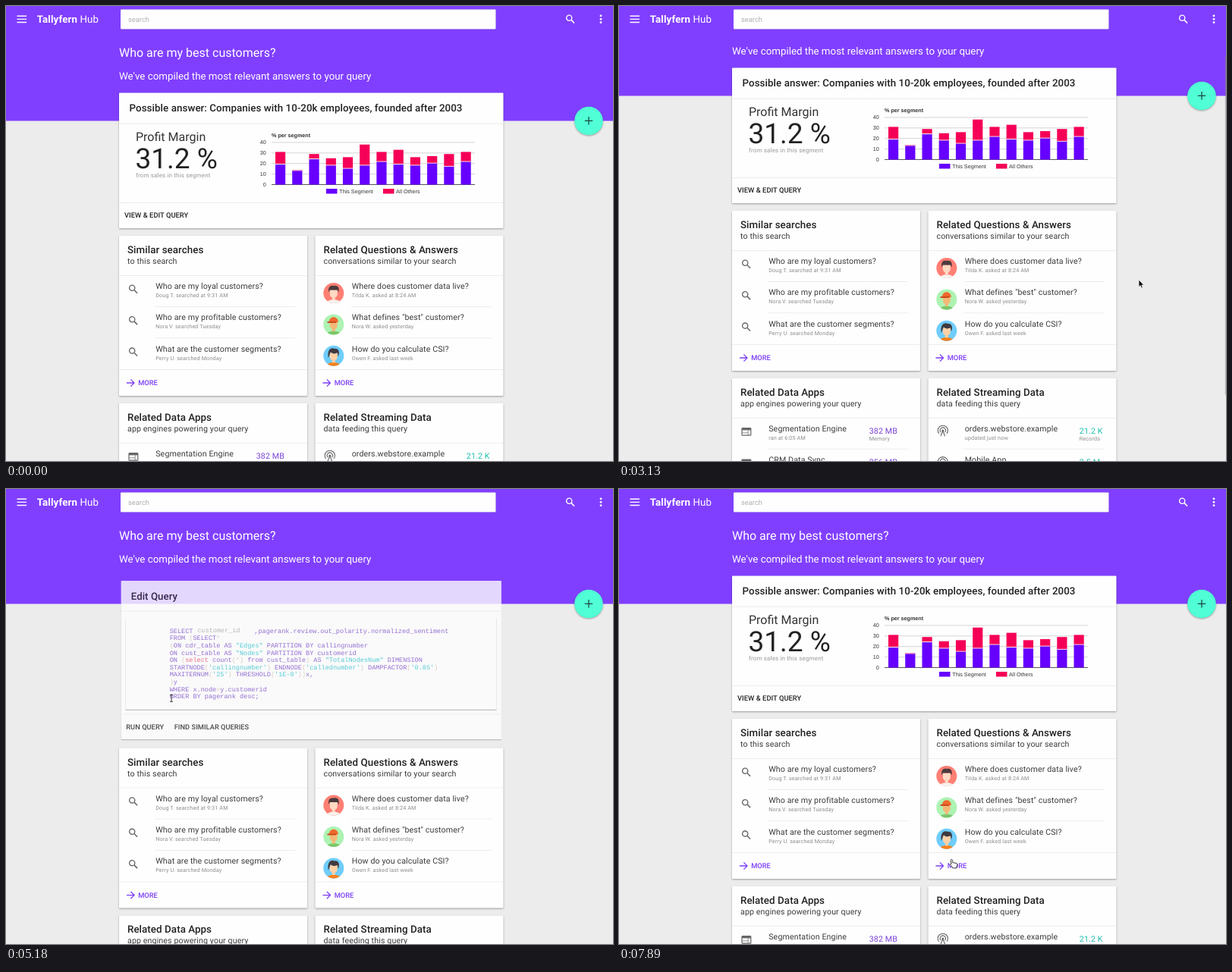
An HTML page for the animation above (8 s loop, 800 px wide and 600 px high).

```html
<!DOCTYPE html>
<html lang="en">
<head>
<meta charset="utf-8">
<title>Dashboard walkthrough</title>
<style>
html, body { margin: 0; width: 100%; height: 100%; overflow: hidden; background: #ececec; }
svg { display: block; width: 800px; height: 600px; }
text { font-family: Roboto, sans-serif; fill: #3c3c3c; white-space: pre; text-rendering: geometricPrecision; }
.hero { font-size: 16px; fill: #fff; }
.lead { font-size: 13.33px; fill: #fff; }
.title { font-size: 13.33px; font-weight: 500; letter-spacing: .005em; fill: #222; }
.body { font-size: 10.67px; letter-spacing: .01em; }
.small { font-size: 7.2px; letter-spacing: .02em; fill: #8c8c8c; }
.note { font-size: 8px; letter-spacing: .02em; fill: #999; }
.button { font-size: 9.33px; font-weight: 500; letter-spacing: .005em; fill: #222; }
.more { font-size: 9.33px; font-weight: 500; fill: #7c3ff5; }
.big { font-size: 37px; fill: #222; }
.axis { font: 7.2px "Liberation Sans", Arial, sans-serif; fill: #333; }
.axis.end { text-anchor: end; }
.axis.bold { font-weight: 700; }
.code { font: 8.65px "Liberation Mono", "Courier New", monospace; fill: #7d50cc; }
.card { fill: #fefefe; filter: drop-shadow(0 1px .8px rgba(0,0,0,.35)); }
</style>
</head>
<body>
<svg id="stage" viewBox="0 0 800 600"></svg>
<script>
const PURPLE = '#803fff', LOOP = 8000;

// ---- drawing helpers ----
const text = (x, y, cls, str, extra = '') => `<text x="${x}" y="${y}" class="${cls}" ${extra}>${str}</text>`;
const rect = (x, y, w, h, fill, extra = '') => `<rect x="${x}" y="${y}" width="${w}" height="${h}" fill="${fill}" ${extra}/>`;
const circle = (x, y, r, fill, extra = '') => `<circle cx="${x}" cy="${y}" r="${r}" fill="${fill}" ${extra}/>`;
const path = (d, fill, extra = '') => `<path d="${d}" fill="${fill}" ${extra}/>`;
const stroke = (d, color, w) => path(d, 'none', `stroke="${color}" stroke-width="${w}"`);
const group = (body, extra = '') => `<g ${extra}>${body}</g>`;
const at = (x, y, body) => group(body, `transform="translate(${x} ${y})"`);
const card = (x, y, w, h) => rect(x, y, w, h, '#fefefe', 'class="card" rx="1"');
const rule = (x, y, w) => rect(x, y, w, .8, '#ebe8e6');

// ---- icons, centred on 0,0 ----
const lens = color => circle(-1.5, -1.5, 3.6, 'none', `stroke="${color}" stroke-width="1.35"`) + stroke('M1.2 1.2L5.4 5.4', color, 1.5);
const appWindow = rect(-5.7, -4.6, 11.8, 9.6, 'none', 'stroke="#666" stroke-width="1.2" rx=".8"') +
  rect(-5.7, -4.6, 11.8, 2.8, '#666') + stroke('M-5.7 1.6H2.5M2.5 -2V5', '#777', .8);
const antenna = stroke('M-5.2 3.6A6.6 6.6 0 1 1 5.2 3.6M-2.6 1.8A3.6 3.6 0 1 1 2.6 1.8M0 0L-2.8 7M0 0L2.8 7', '#666', 1.1) + circle(0, -.4, 1.5, '#666');

const SKIN = '#ffd0a6';
const face = skin => rect(-2, 3, 4, 6, skin) + path('M-5 -4H5V1C5 8 -5 8 -5 1Z', skin);
const avatars = [
  ['#ff7f74', path('M-10 14C-9 7 9 7 10 14Z', '#f6f2ee') + face('#ffd9c2') +
    path('M-6.5 -1C-8 -10 -2 -10 0 -9.5C6 -11 8 -6 6.5 -1L5 -4H-5Z', '#4b3a3d')],
  ['#adf3b3', path('M-10 14C-9 7 9 7 10 14Z', '#7cc76a') + face('#f5b877') +
    path('M-6 -3C-6 -12 6 -12 6 -3Z', '#f0682c') + rect(-8.5, -4, 12, 2, '#c94c1d', 'rx="1"')],
  ['#6fcdfb', path('M-10 14C-9 7 9 7 10 14Z', '#f58220') + face(SKIN) +
    path('M-7 3C-9 -10 -2 -11 1 -9.5C8 -10 8 -3 6 1L5 -4C1 -2 -2 -3 -4 -5Z', '#403a40')]
].map(([back, figure]) => circle(0, 0, 13.5, back) + group(figure, 'clip-path="url(#disc)"'));

// ---- cards ----
function listCard(x, y, title, sub, rows, o) {
  let out = card(x, y, 248, 211) + text(x + 11, y + 23, 'title', title) + text(x + 11, y + 37, 'body', sub) +
    rule(x, y + 52, 248) + rule(x, y + 176, 248);
  rows.forEach(([name, info, value, unit], i) => {
    const ry = y + i * 41.4;
    out += at(x + o.iconX, ry + o.iconY, o.icons[i % o.icons.length]) +
      text(x + 48.2, ry + 70, 'body', name) + text(x + 48.2, ry + 81, 'small', info);
    if (value) out += text(x + o.valueX, ry + 73, 'body', value, `style="fill:${o.color}"`) + text(x + o.valueX, ry + 82, 'small', unit);
    if (i < 2) out += rule(x + 47, ry + 93, 185);
  });
  return out + stroke(`M${x + 10} ${y + 194}h10m-4.6 -4.6l4.6 4.6l-4.6 4.6`, '#7c3ff5', 1.3) + text(x + 25.2, y + 197.3, 'more', 'MORE');
}

const lists =
  listCard(149, 303, 'Similar searches', 'to this search', [
    ['Who are my loyal customers?', 'Doug T. searched at 9:31 AM'],
    ['Who are my profitable customers?', 'Nora V. searched Tuesday'],
    ['What are the customer segments?', 'Perry U. searched Monday']
  ], { icons: [lens('#666')], iconX: 18.7, iconY: 70.3 }) +
  listCard(407.5, 303, 'Related Questions &amp; Answers', 'conversations similar to your search', [
    ['Where does customer data live?', 'Tilda K. asked at 8:24 AM'],
    ['What defines "best" customer?', 'Nora W. asked yesterday'],
    ['How do you calculate CSI?', 'Owen F. asked last week']
  ], { icons: avatars, iconX: 24.3, iconY: 75.5 }) +
  listCard(149, 523.8, 'Related Data Apps', 'app engines powering your query', [
    ['Segmentation Engine', 'ran at 6:05 AM', '382 MB', 'Memory'],
    ['CRM Data Sync', 'ran at 4:35 AM', '256 MB', 'Memory'],
    ['Daily Financials', 'ran at 5:45 AM', '1256 MB', 'Memory']
  ], { icons: [appWindow], iconX: 18.7, iconY: 70.4, valueX: 180.7, color: '#7a42d8' }) +
  listCard(407.5, 523.8, 'Related Streaming Data', 'data feeding this query', [
    ['orders.webstore.example', 'updated just now', '21.2 K', 'Records'],
    ['Mobile App', 'updated at 8:15 AM', '2.5 M', 'Records'],
    ['Tablet App', 'updated at 8:05 AM', '0.9 K', 'Records']
  ], { icons: [antenna], iconX: 19.3, iconY: 69.5, valueX: 199.3, color: '#1fbfae' });

function chart() {
  const base = 235.5, unit = 1.39, inner = [19, 13, 24, 18, 15, 18, 21.5, 19, 18, 20, 17, 21.5],
    total = [31, 14, 29, 25, 26, 38, 31, 33, 26, 27, 29, 31];
  let out = text(350, 173, 'axis bold', '% per segment');
  for (let v = 0; v <= 40; v += 10) {
    const y = base - v * unit;
    out += rect(350, y - .4, 268, .9, v ? '#cfcfcf' : '#444') + text(342.7, y + 2.5, 'axis end', v);
  }
  inner.forEach((v, i) => {
    const x = 355 + i * 22.23, mid = base - v * unit, top = base - total[i] * unit;
    out += rect(x, top, 13.2, mid - top, '#f50057') + rect(x, mid - 1, 13.2, 1, '#fff') + rect(x, mid, 13.2, base - mid, '#6600ff');
  });
  return out + rect(422, 241, 14.5, 6.5, '#6600ff') + text(439.3, 246.8, 'axis', 'This Segment') +
    rect(497, 241, 14.5, 6.5, '#f50057') + text(514, 246.8, 'axis', 'All Others');
}

const answer = card(149, 114.5, 506.5, 178.5) + text(162.5, 139.3, 'title', 'Possible answer: Companies with 10-20k employees, founded after 2003') +
  rule(149, 154.8, 506.5) + rule(149, 259, 506.5) +
  text(171, 178, 'hero', 'Profit Margin', 'style="fill:#333"') + text(170.5, 213.5, 'big', '31.2 %') +
  text(171, 226, 'note', 'from sales in this segment') + chart() +
  rect(152, 264.5, 93, 23.5, '#e8e8e8', 'id="hover" rx="1.5"') + circle(218, 276, 8.5, '#c4c4c4', 'id="ripple"') +
  text(156, 279.4, 'button', 'VIEW &amp; EDIT QUERY');

const query = [
  'SELECT',
  'FROM (SELECT*',
  '(ON cdr_table AS "Edges" PARTITION BY callingnumber',
  'ON cust_table AS "Nodes" PARTITION BY customerid',
  'ON (select count(*) from cust_table) AS "TotalNodesNum" DIMENSION',
  "STARTNODE('callingnumber') ENDNODE('callednumber') DAMPFACTOR('0.85')",
  "MAXITERNUM('25') THRESHOLD('1E-8'))x,",
  ')y',
  'WHERE x.node=y.customerid',
  'ORDER BY pagerank desc;'
];
const paint = line => line.replace(/("[^"]*"|'[^']*')|([()*=]+)|(select)/g, (s, quoted, sign) =>
  `<tspan fill="${quoted ? '#2fc4d0' : sign ? '#d5c3b8' : '#e8506e'}" style="fill:${quoted ? '#2fc4d0' : sign ? '#d5c3b8' : '#e8506e'}">${s}</tspan>`);

const edit = card(149, 120, 506.5, 211.3) + text(162.3, 144.7, 'title', 'Edit Query') + rule(149, 160, 506.5) +
  rect(154.8, 168.5, 494.2, 123, '#fbfbfb', 'class="card"') + rule(149, 297.3, 506.5) +
  query.map((line, i) => text(213.8, 189.4 + i * 9.7, 'code', paint(line))).join('') +
  text(250.6, 188.2, 'code', 'customer_id', 'style="fill:#aaa"') +
  text(326.5, 189.4, 'code', ',pagerank.review.out_polarity.normalized_sentiment') +
  rect(152, 303, 60, 23.5, '#e8e8e8', 'id="press" rx="1.5"') +
  text(155.8, 318.2, 'button', 'RUN QUERY') + text(219.9, 318.2, 'button', 'FIND SIMILAR QUERIES');

const page = rect(0, 0, 800, 151.5, PURPLE) +
  text(149, 66.5, 'hero', 'Who are my best customers?') +
  text(149, 97, 'lead', "We've compiled the most relevant answers to your query") +
  group(answer, 'id="answer"') + group(edit, 'id="edit"') + group(lists, 'id="lists"') +
  circle(768, 151.5, 18.8, '#50ffd6', 'style="filter:drop-shadow(0 1px 1.2px rgba(0,0,0,.35))"') +
  stroke('M762.8 151.3h10.4M768 146.1v10.4', '#1c4a40', 1.3);

const header = rect(0, 0, 800, 38, PURPLE, 'id="bar"') +
  stroke('M14.5 13.3h12.6m-12.6 4.1h12.6m-12.6 4.1h12.6', '#fff', 1.4) +
  text(40.8, 22, 'lead', '<tspan font-weight="700">Tallyfern</tspan> Hub', 'letter-spacing=".1"') +
  rect(151, 4.5, 494.5, 26, '#fefefe', 'rx="1" style="filter:drop-shadow(0 .6px .6px rgba(0,0,0,.3))"') +
  text(161, 20.8, 'more', 'search', 'style="fill:#b0b0b0;font-weight:400"') +
  at(743.7, 17.2, lens('#fff')) + [12.9, 17.3, 21.7].map(y => circle(784, y, 1.4, '#fff')).join('');

const pointers = {
  arrow: path('M0 0V9.6L2.2 7.6L3.7 11L5.3 10.3L3.9 7H6.8Z', '#111', 'stroke="#fff" stroke-width=".7"'),
  beam: stroke('M-1.8 -4.4H1.8M0 -4.4V4.4M-1.8 4.4H1.8', '#222', .9),
  hand: path('M1.8 0C3 0 3.2 1 3.2 2V4L8 5C9.2 5.3 9.5 6 9.2 7.4L8.2 11.4H3.8L.2 7.2C-.4 6.2 .6 5.6 1.4 6.4L.9 1.2C.8 .5 1.2 0 1.8 0Z', '#fff', 'stroke="#222" stroke-width=".9"')
};

const stage = document.getElementById('stage');
stage.innerHTML = `<defs><clipPath id="disc"><circle r="13.5"/></clipPath></defs>` +
  rect(0, 0, 800, 600, '#ececec') + group(page, 'id="page"') + header +
  rect(798.8, 40, 1.2, 446, '#8c8088', 'id="thumb" opacity=".5"') +
  group(Object.entries(pointers).map(([k, d]) => group(d, `id="${k}"`)).join(''), 'id="cursor"');

// ---- motion ----
// The picture holds between these moments, like a screen recording.
const beats = [0, 600, 810, 930, 1050, 1170, 1410, 1530, 1640, 1760, 1970, 2150, 2320, 2440, 2770, 3010, 3130, 3310,
  3480, 3690, 3810, 3930, 4080, 4260, 4730, 4850, 5000, 5180, 5300, 5420, 5530, 5650, 5790, 5910, 6030, 6150,
  6510, 6630, 6780, 6960, 7080, 7200, 7320, 7470, 7590, 7770, 7890];
const scrollKeys = [[1170, 0], [1410, 8], [1530, 42], [1640, 88], [1760, 122], [1970, 142], [2770, 142], [3010, 110], [3130, 33], [3310, 0]];
const cursorKeys = [[600, 682, 511], [810, 684, 480], [1170, 688, 340], [1410, 689, 344], [1970, 689, 346], [2150, 689, 347],
  [2320, 687, 353], [2440, 685, 359], [2770, 685, 361], [3310, 685, 361], [3480, 659, 351], [3930, 258, 288],
  [4080, 216, 279], [4260, 218, 276], [5180, 218, 276], [5650, 217, 281], [5790, 214, 285], [6150, 191, 310],
  [6780, 191, 310], [7320, 215, 365], [7470, 330, 402], [7590, 429, 435], [7770, 434, 467], [7890, 436.5, 488.5]];

function track(keys, t, n = 1) {
  const i = keys.findIndex(k => k[0] > t);
  if (i < 0) return keys[keys.length - 1][n];
  if (!i) return keys[0][n];
  const a = keys[i - 1], b = keys[i];
  return a[n] + (b[n] - a[n]) * (t - a[0]) / (b[0] - a[0]);
}

const $ = id => document.getElementById(id);
const show = (id, on) => $(id).setAttribute('visibility', on ? 'inherit' : 'hidden');
const move = (id, x, y) => $(id).setAttribute('transform', `translate(${x} ${y})`);

// A card fades in while growing from 95% around its centre.
function enter(id, age, cy) {
  const p = 1 - (1 - Math.min(Math.max(age / 700, 0), 1)) ** 2.5, cx = 402.3;
  $(id).setAttribute('opacity', p);
  $(id).setAttribute('transform', `translate(${cx} ${cy}) scale(${.95 + .05 * p}) translate(${-cx} ${-cy})`);
}

function draw(now) {
  const clock = now % LOOP, t = beats.findLast(b => b <= clock);
  const scroll = track(scrollKeys, t), editing = t >= 4850 && t < 6630;

  move('page', 0, -scroll);
  $('bar').style.filter = scroll > 80 ? 'drop-shadow(0 1px 1.5px rgba(0,0,0,.35))' : 'none';
  show('thumb', t >= 1410 && t < 2440 || t >= 3010 && t < 3930);
  $('thumb').setAttribute('y', 40 + scroll * .8);

  show('answer', !editing);
  show('edit', editing);
  enter('answer', t < 4850 ? LOOP : t - 6630, 203.75);
  enter('edit', t - 4850, 225.7);
  move('lists', 0, editing ? 38.6 : 0);
  show('hover', t >= 4260 && t < 4850);
  show('ripple', t >= 4730 && t < 4850);
  show('press', t >= 6510 && t < 6630);

  const shape = t >= 5000 && t < 5910 ? 'beam' : t >= 7890 ? 'hand' : 'arrow';
  for (const k in pointers) show(k, k === shape && t >= 600);
  move('cursor', track(cursorKeys, t), track(cursorKeys, t, 2));
}

function loop() {
  draw(performance.now());
  requestAnimationFrame(loop);
}
loop();
</script>
</body>
</html>
```
